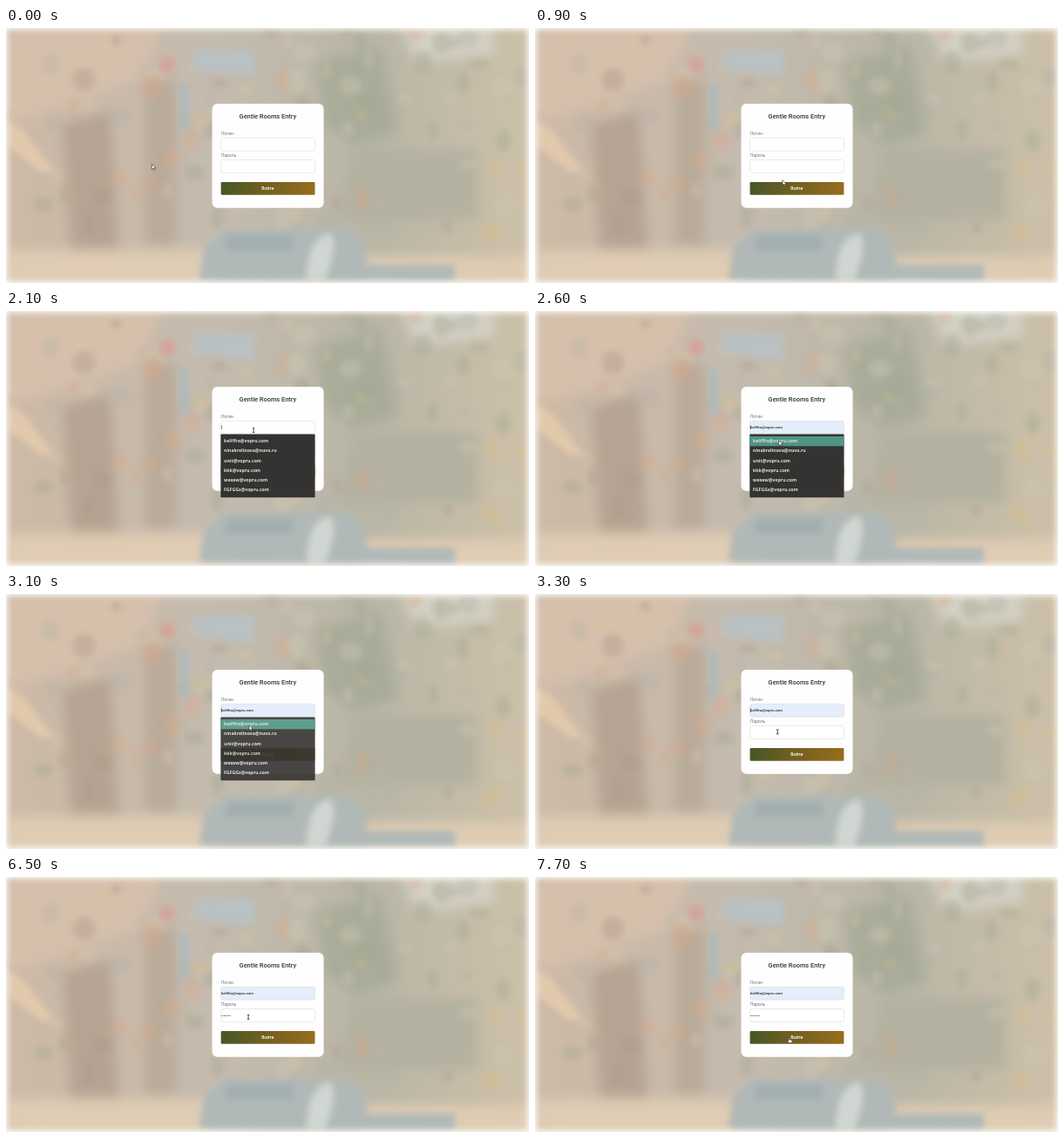
Animation, 600 px wide and 293 px high, one loop 8000 ms. Source, as an HTML page:

```html
<!DOCTYPE html>
<html lang="ru">
<head>
<meta charset="utf-8">
<title>Gentle Rooms Entry</title>
<style>
  html, body { margin: 0; width: 100%; height: 100%; overflow: hidden; background: #c9bfb0; }
  svg { display: block; width: 100%; height: 100%; }
  text { font-family: Roboto, Inter, sans-serif; }
  #list text { font: 600 5.2px "Noto Sans", "Open Sans", sans-serif; fill: #e2e1dd; }
</style>
</head>
<body>
<svg viewBox="0 0 600 293" preserveAspectRatio="none">
  <defs>
    <filter id="soft" filterUnits="userSpaceOnUse" x="-40" y="-40" width="680" height="373"><feGaussianBlur stdDeviation="7"/></filter>
    <filter id="fine" filterUnits="userSpaceOnUse" x="-40" y="-40" width="680" height="373"><feGaussianBlur stdDeviation="3.5"/></filter>
    <linearGradient id="base">
      <stop offset="0" stop-color="#cdb9a6"/>
      <stop offset=".4" stop-color="#c4bbae"/>
      <stop offset=".7" stop-color="#b9b6a6"/>
      <stop offset="1" stop-color="#cdc0a9"/>
    </linearGradient>
    <linearGradient id="btn">
      <stop offset="0" stop-color="#465728"/>
      <stop offset=".5" stop-color="#75601f"/>
      <stop offset="1" stop-color="#976d1d"/>
    </linearGradient>
  </defs>

  <rect width="600" height="293" fill="url(#base)"/>
  <g filter="url(#soft)">
    <path d="M0 0H180L150 60L60 90L0 110Z" fill="#d6c0ac"/>
    <path d="M65 110L120 95L130 265H75Z" fill="#b5a493"/>
    <path d="M160 60H195V250H160Z" fill="#b9aa99"/>
    <path d="M355 40L430 20L450 120L400 135L365 110Z" fill="#a9ac99"/>
    <path d="M400 140H540V220H380Z" fill="#b4b1a0"/>
    <path d="M450 -10H560V30L470 40Z" fill="#d3d0c4"/>
    <path d="M0 255H230V300H0ZM410 262H610V300H410Z" fill="#dfccb3"/>
  </g>
  <g id="leaves" filter="url(#fine)" opacity=".42"></g>
  <g filter="url(#fine)">
    <path d="M0 105L20 118L55 165L40 165L0 135Z" fill="#e2c9ac"/>
    <path d="M215 25H285V56L215 48Z" fill="#b9c1c3"/>
    <path d="M200 65H210V120H200Z" fill="#afbabb"/>
    <path d="M222 290L228 252L250 232H395L412 250V272H515V293Z" fill="#b0b9b7"/>
    <path d="M255 238H330V256H250Z" fill="#a3aeae"/>
    <path d="M345 290Q345 240 372 236Q382 250 366 290Z" fill="#d0d6d1"/>
    <path d="M185 34V50" stroke="#d99a92" stroke-width="16" opacity=".7"/>
  </g>
  <rect x="-3" y="-3" width="606" height="299" fill="none" stroke="#fbfaf5" stroke-width="10" filter="url(#fine)"/>

  <rect x="236.5" y="87" width="128" height="119.8" rx="6" fill="#fffefe"/>
  <text x="300.3" y="103.7" font-size="7.4" font-weight="500" fill="#333" text-anchor="middle">Gentle Rooms Entry</text>
  <g font-size="5.1" fill="#777">
    <text x="246.5" y="122.8">Логин</text>
    <text x="246.5" y="148.2">Пароль</text>
  </g>
  <g stroke="#dcdcdc" stroke-width=".6">
    <rect id="login" x="246.6" y="126.3" width="107.8" height="14.9" rx="2"/>
    <rect x="246.6" y="151.5" width="107.8" height="14.9" rx="2" fill="#fff"/>
    <rect id="invalid" x="246.6" y="151.5" width="107.8" height="14.9" rx="2" fill="none" stroke="#e67a5c" stroke-width=".8"/>
  </g>
  <text id="value" x="247" y="135.2" font-size="4.2" font-weight="500" fill="#222"></text>
  <g id="dots" fill="#444"></g>
  <rect id="caret" width=".6" height="4.8"/>
  <rect x="246.6" y="176.9" width="107.8" height="14.9" rx="1.4" fill="url(#btn)"/>
  <text x="300.3" y="186" font-size="5" font-weight="500" fill="#fff" text-anchor="middle">Войти</text>

  <g id="list">
    <rect x="246.3" y="141.4" width="108.2" height="72.8" rx=".8" fill="#343331"/>
    <rect id="hover" x="246.3" y="144" width="108.2" height="11.3" fill="#4f9583"/>
  </g>

  <path id="arrow" d="M0 0V6.2L1.5 5L2.4 7L3.4 6.6L2.5 4.6H4.4Z" fill="#fff" stroke="#222" stroke-width=".6" stroke-linejoin="round"/>
  <path id="beam" d="M-1.2 -2.7Q0 -2.7 0 -2V2Q0 2.7 -1.2 2.7M1.2 -2.7Q0 -2.7 0 -2M0 2Q0 2.7 1.2 2.7" fill="none" stroke="#111" stroke-width=".8"/>
  <path id="hand" d="M-.5 0Q0 -.5 .5 0V2.1L3 2.6Q3.6 2.8 3.5 3.6L2.9 5.6H0L-1.8 3.4Q-1.5 2.6 -.5 3.3Z" fill="#fff" stroke="#222" stroke-width=".45"/>
</svg>
<script>
const LOOP = 8000, STEP = 100;
const $ = id => document.getElementById(id);
const clamp = v => Math.max(0, Math.min(1, v));
const ease = p => (1 - Math.cos(Math.PI * clamp(p))) / 2;
const within = (t, a, b) => t >= a && t < b;

function add(parent, tag, attrs, text) {
  const el = document.createElementNS("http://www.w3.org/2000/svg", tag);
  for (const k in attrs) el.setAttribute(k, attrs[k]);
  if (text) el.textContent = text;
  parent.append(el);
  return el;
}

// Autumn leaves: orange on the left, green and yellow on the right
let seed = 11;
const rand = () => (seed = (seed * 16807) % 2147483647) / 2147483647;
const left = ["#d9a98a", "#ab9a88", "#dcc3a6", "#b9b2a8"];
const right = ["#d9bf83", "#a2a791", "#cfc8b4", "#b0b3a6"];
for (let i = 0; i < 110; i++) {
  const cx = rand() * 600, cy = rand() * 235;
  const tones = rand() * 600 < cx ? right : left;
  add($("leaves"), "ellipse", {
    cx, cy, rx: 4 + rand() * 9, ry: 4 + rand() * 10,
    fill: tones[Math.floor(rand() * tones.length)]
  });
}

const mails = ["keliffra@vopru.com", "ninakrelinova@nuvo.ru", "unit@vopru.com",
  "kkk@vopru.com", "wexew@vopru.com", "FGFGGs@vopru.com"];
mails.forEach((m, i) => add($("list"), "text", { x: 250, y: 151.2 + i * 11.25 }, m));
$("value").textContent = mails[0];

const KEYS = 8, FIRST_KEY = 4500, KEY_GAP = 200, PITCH = 1.37;
const LAST_KEY = FIRST_KEY + (KEYS - 1) * KEY_GAP;
const FOCUS = 3400;
const dots = Array.from({ length: KEYS }, (_, i) =>
  add($("dots"), "circle", { cx: 247.6 + i * PITCH, cy: 159.2, r: .52 }));

const home = { x: 167.3, y: 156.3 };
const moves = [
  { from: 0, to: 900, x: 284, y: 174.6 },
  { from: 900, to: 1300, x: 286, y: 179 },
  { from: 1400, to: 1900, x: 284, y: 137 },
  { from: 2300, to: 2700, x: 279, y: 150.5 },
  { from: 3100, to: FOCUS, x: 278, y: 161 },
  { from: 6800, to: 7500, x: 291.5, y: 185 }
];

function pointer(t) {
  let { x, y } = home;
  for (const m of moves) {
    const p = ease((t - m.from) / (m.to - m.from));
    x += (m.x - x) * p;
    y += (m.y - y) * p;
  }
  return { x, y };
}

function pointerKind({ x, y }, listOpen) {
  if (!within(x, 246.5, 354.5)) return "arrow";
  if (within(y, 126, 141.5)) return "beam";
  if (listOpen) return "arrow";
  if (within(y, 151, 166.5)) return "beam";
  return within(y, 177, 192) ? "hand" : "arrow";
}

const show = (el, on) => el.setAttribute("visibility", on ? "visible" : "hidden");

function draw(ms) {
  const t = Math.floor(ms / STEP) * STEP;

  const listAlpha = ease((t - 1850) / 200) * (1 - ease((t - 3050) / 250));
  const picked = t >= 2500;
  $("list").setAttribute("opacity", listAlpha);
  show($("hover"), picked);
  show($("value"), picked);
  $("login").setAttribute("fill", picked ? "#e4edf9" : "#fff");

  const typed = dots.filter((_, i) => t >= FIRST_KEY + i * KEY_GAP).length;
  dots.forEach((d, i) => show(d, i < typed));
  const invalid = within(t, FOCUS, LAST_KEY);
  $("invalid").setAttribute("opacity", invalid ? ease((t - FOCUS + STEP) / 300) : 0);

  const inPass = t >= FOCUS;
  const caret = $("caret");
  caret.setAttribute("x", inPass ? 247 + typed * PITCH : 246.9);
  caret.setAttribute("y", inPass ? 156.9 : 131.2);
  caret.setAttribute("fill", invalid ? "#d75b40" : "#333");
  show(caret, within(t, 2000, 3900) || within(t, FIRST_KEY, 6500) || within(t, 7100, 7700));

  const pos = pointer(t);
  const kind = pointerKind(pos, listAlpha > 0);
  for (const id of ["arrow", "beam", "hand"]) show($(id), id === kind);
  $(kind).setAttribute("transform", `translate(${pos.x.toFixed(2)} ${pos.y.toFixed(2)})`);
}

const start = performance.now();
function tick() {
  draw((performance.now() - start) % LOOP);
  requestAnimationFrame(tick);
}
tick();
</script>
</body>
</html>
```
